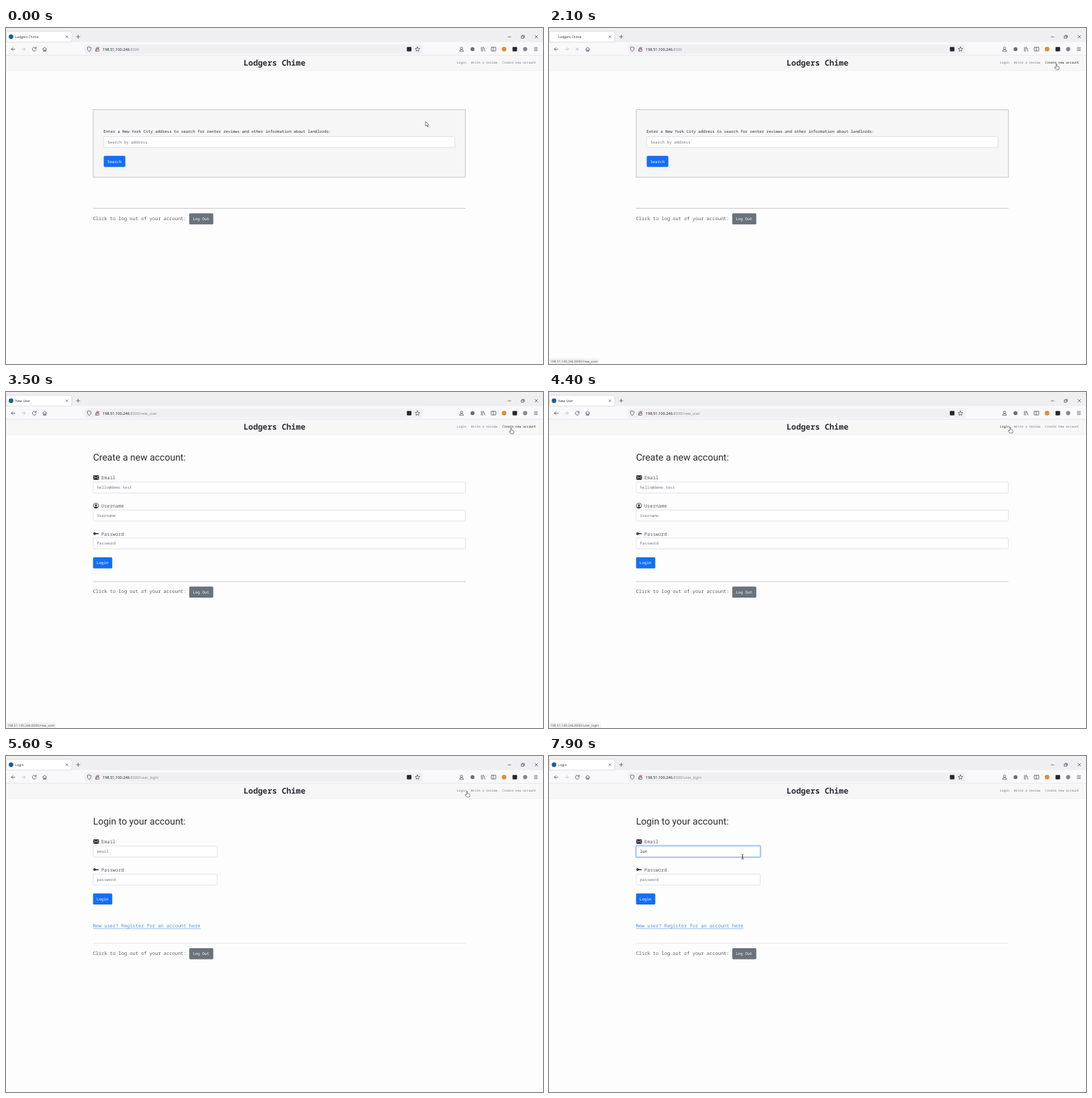
Animation of 800x500 px, one loop 8 s. Source, as an HTML page:

```html
<!DOCTYPE html>
<html lang="en">
<head>
<meta charset="utf-8">
<title>Lodgers Chime</title>
<style>
  html, body { margin: 0; width: 100%; height: 100%; overflow: hidden; background: #fdfdfd; }
  svg { display: block; width: 100vw; height: 100vh; }
  text { text-rendering: geometricPrecision; white-space: pre; }
  .mono { font-family: "Noto Sans Mono", "DejaVu Sans Mono", monospace; }
  .ui { font-family: "Open Sans", "Noto Sans", sans-serif; }
  .head { font-family: Roboto, sans-serif; }
  .line { fill: none; stroke: #55555d; stroke-width: .8; stroke-linecap: round; stroke-linejoin: round; }
</style>
</head>
<body>
<svg id="stage" viewBox="0 0 800 500" xmlns="http://www.w3.org/2000/svg"></svg>
<script>
const LOOP = 8000;
const SITE = "Lodgers Chime", HOST = "198.51.100.246", PORT = ":8000";
const TYPED = "lun";
const SMALL = 5.84, MEDIUM = 7.02, NAV = 4.67;
const INK = "#2b2b35", MUTED = "#5c5c66", HINT = "#777780";

// Markup helpers
const text = (x, y, s, size, fill, cls = "mono", extra = "") =>
  `<text class="${cls}" x="${x}" y="${y}" font-size="${size}" fill="${fill}" ${extra}>${s}</text>`;
const rect = (x, y, w, h, fill, extra = "") =>
  `<rect x="${x}" y="${y}" width="${w}" height="${h}" fill="${fill}" ${extra}/>`;
const circle = (x, y, r, fill, extra = "") =>
  `<circle cx="${x}" cy="${y}" r="${r}" fill="${fill}" ${extra}/>`;
const line = (d, extra = "") => `<path class="line" d="${d}" ${extra}/>`;
const group = (id, body, extra = "") => `<g id="${id}" ${extra}>${body}</g>`;

const button = (x, y, w, label, fill) =>
  rect(x, y, w, 16.5, fill, 'rx="1.6"') + text(x + 5.3, y + 10.3, label, SMALL, "#fff");
const field = (x, y, w, hint, id = "") =>
  rect(x, y, w, 16.2, "#fff", 'rx="1.2" stroke="#d9dce1" stroke-width=".8"') +
  text(x + 5.5, y + 10, hint, SMALL, HINT, "mono", id && `id="${id}"`);
const footer = (y, color) =>
  rect(129.7, y - .4, 554.8, .9, color) +
  text(129.6, y + 17.3, "Click to log out of your account:", MEDIUM, MUTED) +
  button(273, y + 7.5, 35.8, "Log Out", "#6a727a");

const envelope = y =>
  rect(129.9, y, 8.6, 6.7, INK, 'rx="1"') +
  `<path d="M130 ${y + .8}l4.2 2.9 4.2-2.9M130 ${y + 6}l3-2.8M138.4 ${y + 6}l-3-2.8" fill="none" stroke="#fff" stroke-width=".6"/>`;
const person = y =>
  circle(134, y, 3.9, "none", `stroke="${INK}" stroke-width=".8"`) +
  circle(134, y - .8, 1.5, INK) +
  `<path d="M131.2 ${y + 2.6}q2.8-3 5.6 0q-2.8 2.4-5.6 0" fill="${INK}"/>`;
const key = y =>
  circle(131.9, y, 2, INK) + circle(131.2, y, .5, "#fff") +
  `<path d="M133 ${y - .7}h4.6l.8.8-.8.7h-4.6z" fill="${INK}"/>`;
const label = (y, s) => text(142, y, s, MEDIUM, MUTED);
const heading = s => text(129.7, 101.9, s, 14, INK, "head");

function browser() {
  const bars = rect(0, 0, 800, 21, "#efeff2") + rect(0, 21, 800, 20, "#f9f9fb") +
    rect(0, 40.4, 800, .6, "#dfdfe3");
  const tab = rect(.5, 5, 97.5, 16, "#fff", 'rx="2" stroke="#c9c9d0" stroke-width=".6"') +
    `<clipPath id="tabClip">${rect(.7, 5.2, 97, 15.6, "#fff", 'rx="2"')}</clipPath>` +
    `<g clip-path="url(#tabClip)">${circle(8, 13, 0, "#2f97f2", 'id="burst"')}</g>` +
    circle(7.5, 13, 3.4, "#1d5f91", 'id="favicon"') +
    text(14, 14.9, "", 4.9, "#25252c", "ui", 'id="tabTitle"') +
    line("M89.2 11.6l2.8 2.8m0-2.8l-2.8 2.8") + line("M105 13h5m-2.5-2.5v5");
  const windowKeys = line("M748 13.2h4M768 12h3.2v3.2H768zM769 12v-1h3.2v3.2h-1M788 11l4 4m0-4l-4 4");
  const arrows = line("M13.2 31.5H8m2.5-2.6L8 31.5l2.5 2.6") +
    line("M23.7 31.5h5.2m-2.5-2.6l2.5 2.6-2.5 2.6", 'style="stroke:#c2c2c8"') +
    group("reload", line("M44.5 29.8a2.9 2.9 0 1 0 .5 2.4M45 28.4v1.9h-2")) +
    group("stop", line("M40.2 29.7l3.6 3.6m0-3.6l-3.6 3.6", 'style="stroke:#a5a5ad"')) +
    line("M54.6 31.4l3-2.9 3 2.9M55.5 31v3.4h4.2V31M57.1 34.2v-1.8h1v1.8");
  const address = rect(117.5, 24.6, 503, 13.8, "#f0f0f3", 'rx="2"') +
    line("M124 28.2l2.8 1c0 3-.8 4.5-2.8 5.8c-2-1.3-2.8-2.8-2.8-5.8z") +
    line("M134.1 31.2h4.2v3.2h-4.2zM134.9 31v-1a1.3 1.3 0 0 1 2.6 0v1") +
    line("M133.4 34.6l5.6-6", 'style="stroke:#d83450"') +
    `<text class="ui" x="144" y="33.6" font-size="5.64" fill="#18181e">${HOST}<tspan id="path" fill="#85858d"></tspan></text>` +
    rect(597.2, 28.2, 6.8, 6.6, "#25252c", 'rx="1"') +
    line("M613 28.1l1 2.2 2.4.3-1.8 1.6.5 2.4-2.1-1.2-2.1 1.2.5-2.4-1.8-1.6 2.4-.3z");
  const tools = circle(678.6, 30, 1.7, "none", 'stroke="#55555d" stroke-width=".8"') +
    line("M675.7 34.3q0-2.2 2.9-2.2t2.9 2.2z") +
    circle(695, 31.4, 2.9, "#6a6a72") +
    line("M708.2 28.6v5.8m2-5.8v5.8m1.4-5.6l2 5.6") +
    line("M723.3 28.7h6.4v5.4h-6.4zM726 28.7v5.4") +
    circle(742, 31.4, 3.4, "#e58a32") + rect(754.6, 28.2, 6.8, 6.6, "#25252c", 'rx="1"') +
    circle(773.4, 31.4, 3.1, "#85858b") + line("M787 29.2h4.8m-4.8 2.2h4.8m-4.8 2.2h4.8");
  return bars + tab + windowKeys + arrows + address + tools;
}

const links = [[671.8, "Login"], [692.8, "Write a review"], [739.3, "Create new account"]];
const siteBar = () => rect(0, 41, 800, 22.2, "#f7f7f8") + rect(0, 63, 800, .6, "#ececef") +
  text(354, 56.1, SITE, 11.8, INK, "mono", 'font-weight="600"') +
  links.map(([x, s], i) => text(x, 53.1, s, NAV, INK, "mono", `id="link${i}"`)).join("");

const searchPage = () =>
  rect(129.9, 121.6, 554.4, 100.4, "#f6f6f7", 'stroke="#b4bac6" stroke-width=".8"') +
  text(145.3, 156, "Enter a New York City address to search for renter reviews and other information about landlords:", SMALL, INK) +
  field(145.7, 161.6, 523, "Search by address") +
  button(145.6, 190.2, 32.2, "Search", "#146ef5") + footer(268.3, "#c3c3c7");

const signupPage = () => heading("Create a new account:") +
  envelope(124) + label(130.4, "Email") + field(129.9, 134, 554.4, "hello@demo.test") +
  person(169.2) + label(172, "Username") + field(129.9, 175.7, 554.4, "Username") +
  key(210.8) + label(213.6, "Password") + field(129.9, 217.2, 554.4, "Password") +
  button(129.7, 246, 28.6, "Login", "#146ef5") + footer(282.1, "#c3c3c7");

const loginPage = () => heading("Login to your account:") +
  envelope(124) + label(130.4, "Email") + field(129.9, 134, 184.8, "email", "email") +
  group("ring",
    rect(129.1, 133.2, 186.4, 17.8, "none", 'rx="2" stroke="#bcd6fd" stroke-width="1.8"') +
    rect(129.9, 134, 184.8, 16.2, "none", 'rx="1.2" stroke="#86b2f5" stroke-width=".8"')) +
  rect(135.1, 138.2, .6, 7.4, "#222", 'id="caret"') +
  key(169.1) + label(172, "Password") + field(129.9, 175.8, 184.8, "password") +
  button(129.7, 204.5, 28.6, "Login", "#146ef5") +
  text(129.6, 255.2, "New user? Register for an account here", MEDIUM, "#4793e3") +
  rect(129.6, 256.6, 160.2, .6, "#4793e3") + footer(278.4, "#e6e4e6");

const statusBar = () => rect(0, 491.6, 75, 8.4, "#f3f3f5", 'id="statusBox"') +
  text(2, 497.9, "", 4.9, "#55555d", "ui", 'id="statusText"');

const cursors = () =>
  group("arrow", '<path d="M0 0v7l1.7-1.4 1.2 2.6 1.1-.5-1.2-2.5h2.2z" fill="#fff" stroke="#333" stroke-width=".6"/>') +
  group("hand", '<path d="M-.7.8q.7-1.2 1.4 0v3l3 .7q.7.3.5 1.2l-.6 3.3h-4.2l-2.4-3.1q.2-1.1 1.3-.5l1 .6z" fill="#fff" stroke="#333" stroke-width=".6" stroke-linejoin="round"/>') +
  group("beam", '<path d="M-1.7-3.5q1.7 0 1.7.8v5.4q0 .8-1.7.8M1.7-3.5q-1.7 0-1.7.8v5.4q0 .8 1.7.8M-1 .9h2" fill="none" stroke="#333" stroke-width=".7"/>');

document.getElementById("stage").innerHTML =
  rect(0, 0, 800, 500, "#fdfdfd") + browser() + siteBar() +
  group("search", searchPage()) + group("signup", signupPage()) + group("login", loginPage()) +
  group("status", statusBar()) + group("cursor", cursors());

const el = id => document.getElementById(id);
const show = (id, on) => el(id).setAttribute("display", on ? "inline" : "none");
const set = (id, name, value) => el(id).setAttribute(name, value);
const clamp = v => Math.max(0, Math.min(1, v));
const within = (t, a, b) => t >= a && t < b;
const fade = (t, a, b, rise = 120, fall = 120) => clamp((t - a) / rise) * (1 - clamp((t - b) / fall));
const mix = (a, b, k) => a + (b - a) * k;

// Pointer stops: time, x, y
const stops = [[0, 625, 139], [200, 714, 78], [400, 714, 78], [1100, 756, 53], [3200, 756, 53],
  [4000, 745, 53], [4300, 687, 52], [5850, 687, 52], [6300, 288.4, 150], [LOOP, 288.4, 150]];
function pointer(t) {
  const i = stops.findIndex(s => s[0] > t);
  const [t0, x0, y0] = stops[i - 1], [t1, x1, y1] = stops[i];
  const u = (t - t0) / (t1 - t0), k = u * u * (3 - 2 * u);
  return [mix(x0, x1, k), mix(y0, y1, k)];
}

const pages = [
  { id: "search", from: 0, title: SITE, path: "" },
  { id: "signup", from: 2200, title: "New User", path: "/new_user" },
  { id: "login", from: 5000, title: "Login", path: "/user_login" }
];
const hovers = [[0, 4200, 4850], [0, 5700, 5880], [2, 1050, 2500], [2, 2500, 4020]];
const statuses = [[1, 1250, 2350], [1, 3250, 4000], [2, 4250, 4900], [2, 5700, 5900]];

function draw(t) {
  const page = pages.filter(p => t >= p.from).pop();
  pages.forEach(p => show(p.id, p === page));
  el("tabTitle").textContent = page.title;
  el("path").textContent = PORT + page.path;

  const loading = within(t, 1900, 2500) || within(t, 4700, 5300);
  show("reload", !loading);
  show("stop", loading);
  set("stop", "opacity", t < 3000 ? 1 - .6 * clamp((t - 2250) / 150) : 1);
  show("favicon", !within(t, 2050, 2300) && !within(t, 4800, 5200));
  const age = page.from ? t - page.from : 1e4;
  set("burst", "r", age < 420 ? Math.max(0, .39 * (age - 31)) : 0);
  set("burst", "opacity", clamp(.52 - age * .0017) || .001);

  links.forEach((_, i) => {
    const k = Math.max(0, ...hovers.filter(h => h[0] === i).map(h =>
      h[1] === 2500 ? +within(t, 2500, 4020) : fade(t, h[1], h[2])));
    const c = [[118, 36], [118, 36], [138, 42]].map(([a, b]) => Math.round(mix(a, b, k)));
    set("link" + i, "fill", `rgb(${c})`);
  });

  const status = statuses.find(s => within(t, s[1], s[2] + 120));
  show("status", status);
  if (status) {
    el("statusText").textContent = HOST + PORT + pages[status[0]].path;
    set("statusBox", "width", status[0] === 1 ? 74.5 : 77);
    set("status", "opacity", fade(t, status[1], status[2], 80));
  }

  const [x, y] = pointer(t);
  set("cursor", "transform", `translate(${x} ${y})`);
  const onLink = y < 55 && links.some(([lx, s]) => x >= lx && x <= lx + s.length * 2.83 + 2);
  const onField = page.id === "login" && y > 134 && y < 151 && x < 315;
  show("hand", onLink);
  show("beam", onField);
  show("arrow", !onLink && !onField);

  const count = Math.max(0, Math.min(3, Math.floor((t - 7600) / 100)));
  el("email").textContent = count ? TYPED.slice(0, count) : "email";
  set("email", "fill", count ? "#22222a" : HINT);
  set("ring", "opacity", clamp((t - 6410) / 150));
  show("caret", t >= 6400 && !count && (t - 6400) % 1000 < 500);
}

function tick(now) {
  draw(now % LOOP);
  requestAnimationFrame(tick);
}
draw(0);
requestAnimationFrame(tick);
</script>
</body>
</html>
```
